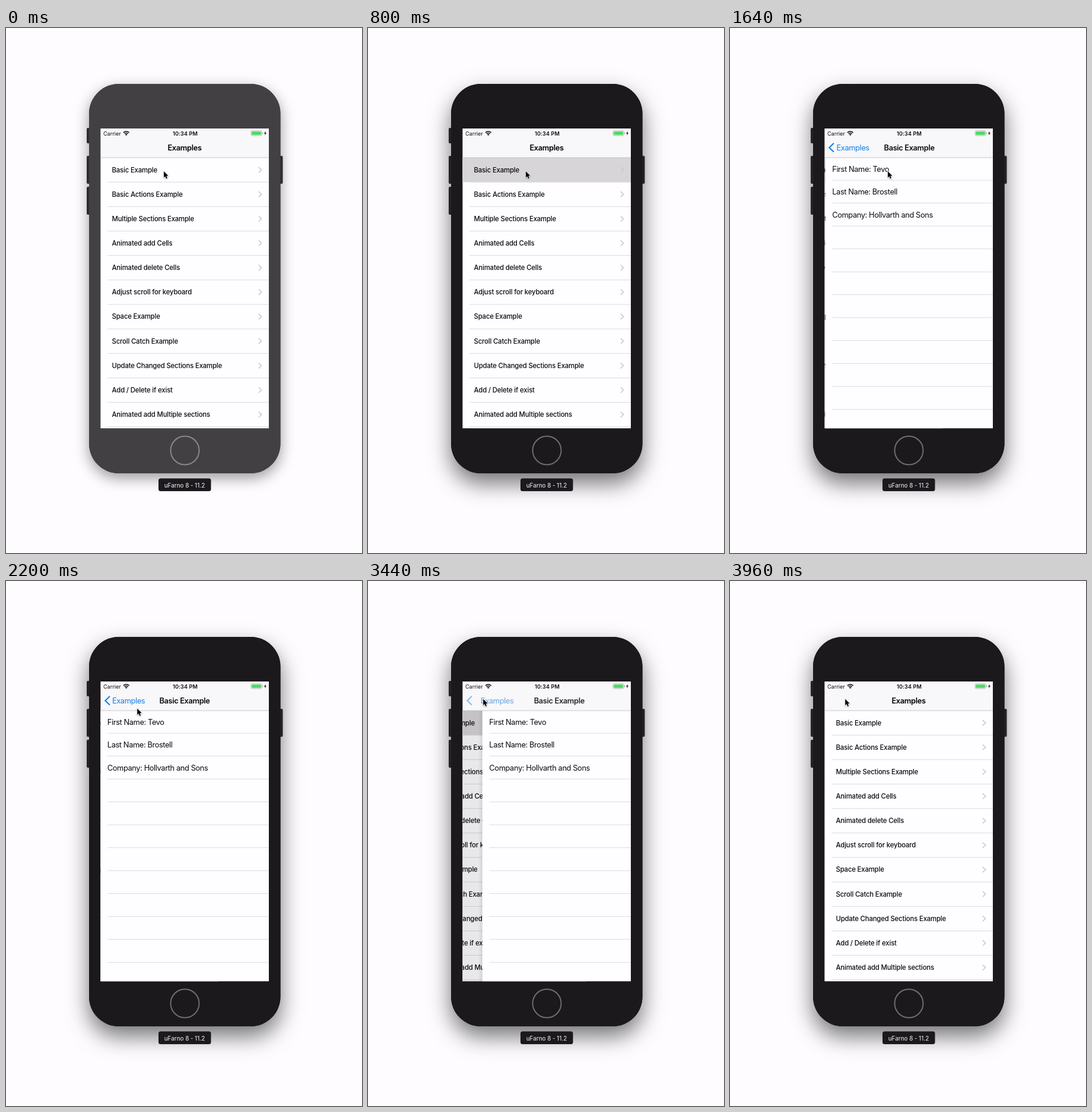
An HTML page with a canvas for the animation above (4000 ms loop, 600x883 px).

```html
<!DOCTYPE html>
<html lang="en">
<head>
<meta charset="utf-8">
<title>Phone list navigation</title>
<style>
html, body { margin: 0; width: 100%; height: 100%; overflow: hidden; background: #fefcff; }
canvas { display: block; }
</style>
</head>
<body>
<canvas id="stage" width="600" height="883"></canvas>
<script>
const ctx = document.getElementById('stage').getContext('2d');
const LOOP = 4000, STEP = 40;
const SCREEN = { x: 159.2, y: 169, w: 283.8, h: 504.5 };
const RIGHT = SCREEN.x + SCREEN.w, BOTTOM = SCREEN.y + SCREEN.h;
const BAR_BOTTOM = 218;
const PAGE = '#fefdff', LINE = '#d3d2d6', BLUE = [22, 128, 228];
const FAMILY = 'Inter, Roboto, "Liberation Sans", sans-serif';

const MENU = [
  'Basic Example', 'Basic Actions Example', 'Multiple Sections Example',
  'Animated add Cells', 'Animated delete Cells', 'Adjust scroll for keyboard',
  'Space Example', 'Scroll Catch Example', 'Update Changed Sections Example',
  'Add / Delete if exist', 'Animated add Multiple sections'
];
const DETAILS = ['First Name: Tevo', 'Last Name: Brostell', 'Company: Hollvarth and Sons'];

const clamp = v => Math.min(1, Math.max(0, v));
const ramp = (t, a, b) => clamp((t - a) / (b - a));
const smooth = u => u * u * (3 - 2 * u);
const lerp = (a, b, u) => a + (b - a) * u;

// Critically damped spring from 0 to 1
function spring(t, start) {
  const x = Math.max(0, t - start) * 0.019;
  return x > 9 ? 1 : 1 - (1 + x) * Math.exp(-x);
}

function text(str, x, y, size, weight, color, spacing = 0, align = 'left') {
  ctx.font = `${weight} ${size}px ${FAMILY}`;
  ctx.letterSpacing = spacing + 'px';
  ctx.textAlign = align;
  ctx.fillStyle = color;
  ctx.fillText(str, x, y);
}

function rect(x, y, w, h, color) {
  ctx.fillStyle = color;
  ctx.fillRect(x, y, w, h);
}

function round(x, y, w, h, r, color) {
  ctx.beginPath();
  ctx.roundRect(x, y, w, h, r);
  ctx.fillStyle = color;
  ctx.fill();
}

function path(points, x = 0, y = 0) {
  ctx.beginPath();
  points.forEach(([px, py]) => ctx.lineTo(x + px, y + py));
}

function stroke(color, width) {
  ctx.strokeStyle = color;
  ctx.lineWidth = width;
  ctx.stroke();
}

function faded(alpha, draw) {
  if (alpha <= 0) return;
  ctx.save();
  ctx.globalAlpha = alpha;
  draw();
  ctx.restore();
}

function drawPhone(active) {
  const body = active ? '#1b191b' : '#424042';
  const side = active ? '#242226' : '#2e2c30';
  const shell = () => round(140, 94, 322.5, 655, 50, body);
  ctx.save();
  ctx.shadowColor = active ? 'rgba(0,0,0,.55)' : 'rgba(0,0,0,.4)';
  ctx.shadowBlur = active ? 37 : 25;
  ctx.shadowOffsetY = active ? 17 : 8;
  shell();
  ctx.restore();

  [[168, 26], [215, 47], [267, 47]].forEach(([y, h]) => round(136, y, 6, h, 2, side));
  round(460.5, 215, 6, 47, 2, side);
  shell();

  ctx.beginPath();
  ctx.arc(301.5, 710.5, 24, 0, Math.PI * 2);
  stroke(active ? '#6f6d6f' : '#8a888a', 2);

  round(257, 757.5, 88.5, 21.5, 3.5, '#1b191d');
  text('uFarno 8 - 11.2', 301, 772.8, 9.83, 500, '#d9d8da', 0, 'center');
}

function drawMenu(dx, highlight) {
  const pitch = 41.16, left = SCREEN.x + dx;
  rect(left, BAR_BOTTOM, SCREEN.w, BOTTOM - BAR_BOTTOM, PAGE);
  MENU.forEach((label, i) => {
    const y = BAR_BOTTOM + i * pitch;
    rect(171 + dx, y + pitch - 0.4, RIGHT - 171, 0.8, LINE);
    if (i === 0) {
      faded(highlight, () => rect(left, y, SCREEN.w, pitch, '#d7d5d7'));
    }
    text(label, 178.5 + dx, y + 24.5, 11.34, 500, '#0b0a0c', -0.16);
    path([[0, 0], [4.8, 4.6], [0, 9.2]], 425.8 + dx, y + 15.9);
    stroke('#c8c7cc', 1.5);
  });
}

function drawDetails(dx) {
  const pitch = 38.53, left = SCREEN.x + dx;
  const edge = ctx.createLinearGradient(left - 7, 0, left, 0);
  edge.addColorStop(0, 'rgba(0,0,0,0)');
  edge.addColorStop(1, 'rgba(0,0,0,.1)');
  faded(1 - dx / SCREEN.w, () => rect(left - 7, BAR_BOTTOM, 7, BOTTOM - BAR_BOTTOM, edge));
  rect(left, BAR_BOTTOM, SCREEN.w, BOTTOM - BAR_BOTTOM, PAGE);
  for (let i = 0; i < 11; i++) {
    const y = 256 + i * pitch;
    rect(171 + dx, y - 0.4, RIGHT - 171, 0.8, LINE);
    if (DETAILS[i]) text(DETAILS[i], 170.8 + dx, y - 14.4, 12.85, 400, '#0b0a0c', -0.4);
  }
}

function drawStatus() {
  text('Carrier', 164, 180.8, 9.07, 400, '#0b0a0c');
  text('10:34 PM', 302, 180.8, 9.07, 600, '#0b0a0c', 0.1, 'center');

  ctx.beginPath();
  ctx.moveTo(202.7, 181);
  ctx.arc(202.7, 181, 2.6, -Math.PI * 0.75, -Math.PI * 0.25);
  ctx.fillStyle = '#0b0a0c';
  ctx.fill();
  [4.3, 7].forEach(r => {
    ctx.beginPath();
    ctx.arc(202.7, 181, r, -Math.PI * 0.75, -Math.PI * 0.25);
    stroke('#0b0a0c', 1.6);
  });

  ctx.beginPath();
  ctx.roundRect(413, 173, 18, 8, 2);
  stroke('#a3a8a4', 0.8);
  round(414.2, 174.2, 15.6, 5.6, 1, '#4cd964');
  round(431.8, 175.6, 1.2, 2.8, 0.6, '#a3a8a4');
  path([[2.6, 0], [0, 4], [1.8, 4], [1.2, 7], [4, 2.9], [2.2, 2.9]], 435, 173.6);
  ctx.fillStyle = '#0b0a0c';
  ctx.fill();
}

function drawBar(p, dim) {
  rect(SCREEN.x, SCREEN.y, SCREEN.w, BAR_BOTTOM - SCREEN.y, '#f8f7fa');
  rect(SCREEN.x, BAR_BOTTOM - 0.4, SCREEN.w, 0.8, '#b9b8bc');
  drawStatus();

  const blue = `rgb(${BLUE})`;
  const tint = `rgb(${BLUE.map(c => Math.round(c * p))})`;
  const x = lerp(301, 206.5, p), y = 206;
  faded(1 - p, () => text('Examples', x, y, 12.85, 600, tint, -0.35, 'center'));
  faded(p * dim, () => {
    text('Examples', x, y, 12.85, 400, tint, -0.4, 'center');
    path([[7.6, 0], [0, 7.4], [7.6, 14.8]], 167.3, 193.8);
    stroke(blue, 2.1);
  });
  faded(p, () => text('Basic Example', 301 + 180 * (1 - p), y, 12.85, 600, '#0b0a0c', -0.37, 'center'));
}

function drawCursor(x, y) {
  ctx.save();
  ctx.shadowColor = 'rgba(0,0,0,.35)';
  ctx.shadowBlur = 2;
  ctx.shadowOffsetY = 1;
  path([[0, 0], [0, 10.6], [2.4, 8.4], [4, 12.2], [5.9, 11.4], [4.3, 7.7], [7.5, 7.5]], x, y);
  ctx.closePath();
  ctx.lineJoin = 'round';
  stroke('#fff', 1.4);
  ctx.restore();
  ctx.fillStyle = '#000';
  ctx.fill();
}

function render(t) {
  const back = spring(t, 3409);
  const page = spring(t, 1249) - back;
  const bar = spring(t, 1261) - back;
  const highlight = t < 760 ? 0 : 1 - ramp(t, 3740, 3940);
  const dim = 1 - 0.65 * ramp(t, 3160, 3240) * (1 - ramp(t, 3400, 3520));
  const move = smooth(ramp(t, 1920, 2400));

  rect(0, 0, 600, 883, '#fefcff');
  drawPhone(t >= 600);

  ctx.save();
  ctx.beginPath();
  ctx.rect(SCREEN.x, SCREEN.y, SCREEN.w, SCREEN.h);
  ctx.clip();
  drawMenu(-0.3 * SCREEN.w * page, highlight);
  rect(SCREEN.x, BAR_BOTTOM, SCREEN.w, BOTTOM - BAR_BOTTOM, `rgba(0,0,0,${0.1 * page})`);
  if (page > 0) drawDetails(SCREEN.w * (1 - page));
  drawBar(bar, dim);
  ctx.restore();

  drawCursor(lerp(266, 194.2, move), lerp(241, 198.5, move));
}

const begin = performance.now();
function tick() {
  const t = (performance.now() - begin) % LOOP;
  render(Math.floor(t / STEP) * STEP);
  requestAnimationFrame(tick);
}
tick();
</script>
</body>
</html>
```
